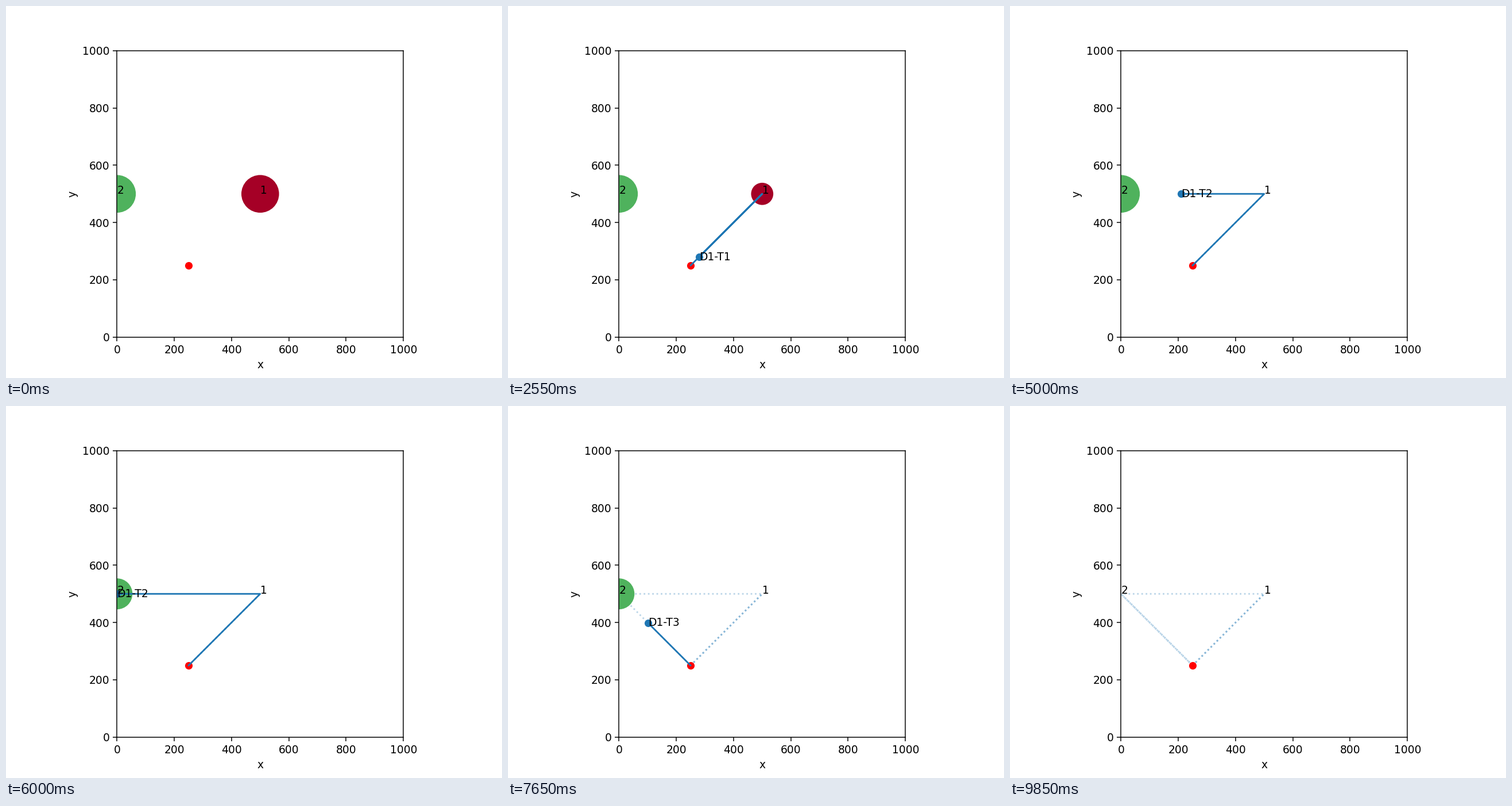
A matplotlib script for the animation above (10000 ms loop, 864 by 648 pixels).

```python
import math

import matplotlib.pyplot as plt
from matplotlib.animation import FuncAnimation

FRAMES, INTERVAL = 200, 50
BLUE = "#1f77b4"
BASE = (250, 250)
SITES = {1: (500, 500), 2: (0, 500)}
COLORS = ["#a50026", "#4fb25d"]
FULL = 1156      # marker area of a site with all of its demand open

# All durations are counted in frames.
SPEED = 22.25    # data units per frame
UNLOAD = 10.545  # time to unload one third of a site's demand
RELOAD = 7.66    # pause at the base between trips

# Each trip lists (site, thirds unloaded there).
TRIPS = [[(1, 2)], [(1, 1), (2, 1)], [(2, 2)]]


def flight_time(a, b):
    return math.dist(a, b) / SPEED


def plan(stops, start):
    """Return the legs (t0, t1, a, b), unloadings (t0, t1, site, thirds) and end."""
    legs, drops, t, here = [], [], start, BASE
    for site, thirds in stops:
        there = SITES[site]
        arrive = t + flight_time(here, there)
        legs.append((t, arrive, here, there))
        t = arrive + thirds * UNLOAD
        drops.append((arrive, t, site, thirds))
        here = there
    end = t + flight_time(here, BASE)
    legs.append((t, end, here, BASE))
    return legs, drops, end


def make_schedule():
    schedule, start = [], 0
    for stops in TRIPS:
        legs, drops, end = plan(stops, start)
        schedule.append((start, end, legs, drops))
        start = end + RELOAD
    return schedule


def progress(t, t0, t1):
    return min(max((t - t0) / (t1 - t0), 0), 1)


def flown_path(legs, t):
    points = [BASE]
    for t0, t1, a, b in legs:
        if t <= t0:
            break
        u = progress(t, t0, t1)
        points.append((a[0] + (b[0] - a[0]) * u, a[1] + (b[1] - a[1]) * u))
    return points


def open_area(site, t):
    done = sum(
        thirds * progress(t, t0, t1)
        for _, _, _, drops in schedule
        for t0, t1, where, thirds in drops
        if where == site
    )
    return max(FULL * (1 - done / 3), 0)


schedule = make_schedule()

fig, ax = plt.subplots(figsize=(6.4, 4.8), dpi=135)
ax.set_aspect("equal")
ax.set_xlim(0, 1000)
ax.set_ylim(0, 1000)
ax.set_xlabel("x")
ax.set_ylabel("y")

ax.plot(*BASE, "o", color="red", zorder=1.5)
demand = ax.scatter(*zip(*SITES.values()), s=[FULL] * len(SITES), c=COLORS, zorder=1)
for site, (x, y) in SITES.items():
    ax.text(x, y, str(site))

trails = []
for _, end, legs, _ in schedule:
    xs, ys = zip(*flown_path(legs, end))
    trails.append(ax.plot(xs, ys, ":", color=BLUE, alpha=0.3, zorder=0.5)[0])

(route,) = ax.plot([], [], color=BLUE)
(drone,) = ax.plot([], [], "o", color=BLUE)
label = ax.text(*BASE, "", va="center")


def update(t):
    demand.set_sizes([open_area(site, t) for site in SITES])

    flying = False
    for number, (start, end, legs, _) in enumerate(schedule, 1):
        trails[number - 1].set_visible(t >= end)
        if start < t < end:
            flying = True
            points = flown_path(legs, t)
            route.set_data(*zip(*points))
            drone.set_data([points[-1][0]], [points[-1][1]])
            label.set_position(points[-1])
            label.set_text(f"D1-T{number}")
    for artist in (route, drone, label):
        artist.set_visible(flying)
    return [demand, *trails, route, drone, label]


anim = FuncAnimation(fig, update, frames=FRAMES, interval=INTERVAL,
                     init_func=lambda: update(0), repeat=True, repeat_delay=0)
plt.show()
```
